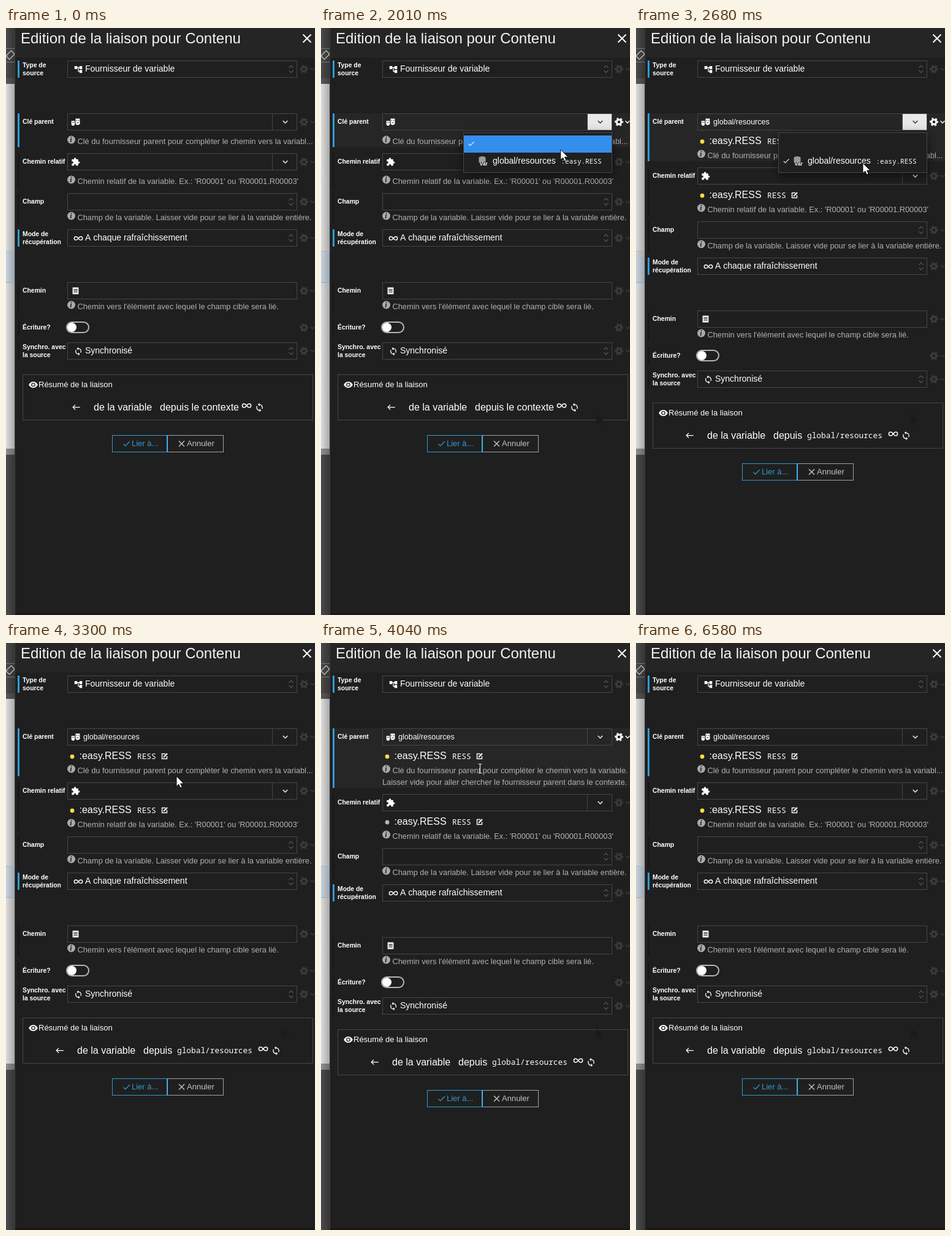
Animation of 504x956 px, one loop 7110 ms. Source, as an HTML page with a canvas:

```html
<!DOCTYPE html>
<html lang="fr">
<head>
<meta charset="utf-8">
<title>Edition de la liaison</title>
<style>
html, body { margin: 0; width: 100%; height: 100%; overflow: hidden; background: #1f1f1f; }
canvas { display: block; width: 504px; height: 956px; }
</style>
</head>
<body>
<canvas id="stage"></canvas>
<script>
const W = 504, H = 956, LOOP = 7110;
const canvas = document.getElementById('stage');
const ratio = window.devicePixelRatio || 1;
canvas.width = W * ratio;
canvas.height = H * ratio;
const c = canvas.getContext('2d');

const SANS = '"Liberation Sans", Arial, sans-serif';
const MONO = '"Noto Sans Mono", "DejaVu Sans Mono", monospace';
const BG = '#1f1f1f', LINE = '#464646', BLUE = '#2f9bd4', HINT = '#b2b2b2', DIM = '#3b3b3b';

// Icons on a 24 x 24 grid
const ICON = {
  tree: 'M22 11V3h-7v3H9V3H2v8h7V8h2v10h4v3h7v-8h-7v3h-2V8h2v3z',
  puzzle: 'M20.5 11H19V7c0-1.1-.9-2-2-2h-4V3.5a2.5 2.5 0 0 0-5 0V5H4c-1.1 0-2 .9-2 2v3.8h1.5a2.7 2.7 0 0 1 0 5.4H2V20c0 1.1.9 2 2 2h3.8v-1.5a2.7 2.7 0 0 1 5.4 0V22H17c1.1 0 2-.9 2-2v-4h1.5a2.5 2.5 0 0 0 0-5z',
  sync: 'M12 4V1L8 5l4 4V6c3.3 0 6 2.7 6 6 0 1-.25 2-.7 2.8l1.46 1.46A7.9 7.9 0 0 0 20 12c0-4.4-3.6-8-8-8zm0 14c-3.3 0-6-2.7-6-6 0-1 .25-2 .7-2.8L5.24 7.74A7.9 7.9 0 0 0 4 12c0 4.4 3.6 8 8 8v3l4-4-4-4v3z',
  eye: 'M12 4.5C7 4.5 2.7 7.6 1 12c1.7 4.4 6 7.5 11 7.5s9.3-3.1 11-7.5c-1.7-4.4-6-7.5-11-7.5zM12 17a5 5 0 1 1 0-10 5 5 0 0 1 0 10zm0-8a3 3 0 1 0 0 6 3 3 0 0 0 0-6z',
  back: 'M9 19l1.4-1.4L5.8 13H22v-2H5.8l4.6-4.6L9 5l-7 7z',
  check: 'M9 16.2L4.8 12l-1.4 1.4L9 19 21 7l-1.4-1.4z',
  list: 'M3 2h18v20H3zM6 7h12v2H6zM6 11h12v2H6zM6 15h12v2H6z',
  masks: 'M1 9h9v8a4.5 4.5 0 0 1-9 0zM3 12h2v2H3zM6.5 12h2v2h-2zM12 3h11v9a5.5 5.5 0 0 1-11 4zM14 7h2v2h-2zM19 7h2v2h-2zM15 13h5v1.6h-5z'
};
const LOOPS = 'M12 12C10 9 8.5 8 6.5 8a4 4 0 0 0 0 8c2 0 3.5-1 5.5-4s3.5-4 5.5-4a4 4 0 0 1 0 8c-2 0-3.5-1-5.5-4';
const ARROW = new Path2D('M0 0V16.5L3.8 13 6.4 18.8 9.2 17.6 6.6 12H12z');

const ROWS = [
  { y: 53, h: 28, label: ['Type de', 'source'], blue: 1, icon: 'tree', value: 'Fournisseur de variable', kind: 'select' },
  { y: 139, h: 55, label: ['Clé parent'], blue: 1, icon: 'masks', kind: 'combo', hintY: 45,
    hint: 'Clé du fournisseur parent pour compléter le chemin vers la variabl...' },
  { y: 204, h: 55, label: ['Chemin relatif'], icon: 'puzzle', kind: 'combo', hintY: 45,
    hint: "Chemin relatif de la variable. Ex.: 'R00001' ou 'R00001.R00003'" },
  { y: 269, h: 50, label: ['Champ'], kind: 'select', hintY: 39,
    hint: 'Champ de la variable. Laisser vide pour se lier à la variable entière.' },
  { y: 328, h: 28, label: ['Mode de', 'récupération'], blue: 1, icon: 'loops', value: 'A chaque rafraîchissement', kind: 'select' },
  { y: 414, h: 49, label: ['Chemin'], icon: 'list', kind: 'input', hintY: 39,
    hint: "Chemin vers l'élément avec lequel le champ cible sera lié." },
  { y: 474, h: 27, label: ['Écriture?'], kind: 'toggle' },
  { y: 512, h: 28, label: ['Synchro. avec', 'la source'], icon: 'sync', value: 'Synchronisé', kind: 'select' }
];

// Pointer moves: start, end, number of steps, [progress, x, y] points
const MOVES = [
  [530, 1210, 11, [[0, 438, 866], [.1, 449, 627], [.3, 450, 440], [.5, 452, 285], [.7, 454, 180], [.85, 457, 128], [1, 456, 152]]],
  [1870, 2280, 7, [[0, 448, 157], [.33, 391, 198], [.67, 375, 215], [1, 370, 220]]],
  [2840, 3500, 11, [[0, 370, 220], [.35, 328, 252], [.7, 278, 217], [1, 262, 211]]],
  [3570, 3840, 4, [[0, 261, 210], [1, 259.5, 205]]],
  [4040, 4040, 1, [[0, 259.5, 204.5]]],
  [4830, 5520, 10, [[0, 260, 205], [.5, 268, 214], [1, 279, 225]]],
  [5580, 5580, 1, [[0, 280.5, 227]]],
  [6380, 6510, 3, [[0, 292, 300], [.5, 310, 590], [1, 326, 918]]]
];

function pointer(t) {
  if (t < 530 || t >= 6580) return null;
  const [t0, t1, n, pts] = MOVES.filter(m => t >= m[0]).pop();
  let u = 0;
  if (n > 1) u = Math.floor(Math.min(1, (t - t0) / (t1 - t0)) * (n - 1) + .02) / (n - 1);
  let i = 1;
  while (i < pts.length - 1 && u > pts[i][0]) i++;
  const a = pts[i - 1] || pts[0], b = pts[i] || a;
  const k = b === a ? 0 : (u - a[0]) / (b[0] - a[0]);
  return { x: a[1] + (b[1] - a[1]) * k, y: a[2] + (b[2] - a[2]) * k };
}

function rect(x, y, w, h, fill) {
  c.fillStyle = fill;
  c.fillRect(x, y, w, h);
}

function frame(x, y, w, h, color = LINE) {
  c.strokeStyle = color;
  c.lineWidth = 1;
  c.strokeRect(x + .5, y + .5, w - 1, h - 1);
}

function text(s, x, y, size, color = '#fff', font = SANS, weight = '') {
  c.font = `${weight} ${size}px ${font}`;
  c.fillStyle = color;
  c.fillText(s, x, y);
}

function poly(pts, color, width) {
  c.beginPath();
  pts.forEach(([x, y]) => c.lineTo(x, y));
  c.strokeStyle = color;
  c.lineWidth = width;
  c.stroke();
}

function disc(x, y, r, color) {
  c.beginPath();
  c.arc(x, y, r, 0, Math.PI * 2);
  c.fillStyle = color;
  c.fill();
}

function icon(name, x, y, size, color = '#fff') {
  c.save();
  c.translate(x, y);
  c.scale(size / 24, size / 24);
  c.translate(-12, -12);
  if (name === 'loops') {
    c.strokeStyle = color;
    c.lineWidth = 2;
    c.stroke(new Path2D(LOOPS));
  } else {
    c.fillStyle = color;
    c.fill(new Path2D(ICON[name]), 'evenodd');
  }
  c.restore();
}

function chevron(x, y, r, color, width = 1.5, dir = 1) {
  poly([[x - r, y - dir * r / 2], [x, y + dir * r / 2], [x + r, y - dir * r / 2]], color, width);
}

function cross(x, y, r, color, width) {
  poly([[x - r, y - r], [x + r, y + r]], color, width);
  poly([[x - r, y + r], [x + r, y - r]], color, width);
}

function gear(x, y, color) {
  c.strokeStyle = color;
  c.lineWidth = 3;
  c.beginPath();
  c.arc(x, y, 3.8, 0, Math.PI * 2);
  c.stroke();
  c.lineWidth = 2;
  c.setLineDash([Math.PI, Math.PI]);
  c.beginPath();
  c.arc(x, y, 6, -.26, Math.PI * 2 - .26);
  c.stroke();
  c.setLineDash([]);
}

function info(x, y) {
  disc(x, y, 6.5, '#a9a9a9');
  text('i', x - 2.3, y + 4.2, 12, BG, '"Liberation Serif", serif', 'italic bold');
}

function shade(y, h, from, to) {
  const g = c.createLinearGradient(0, 0, 14, 0);
  g.addColorStop(0, from);
  g.addColorStop(1, to);
  rect(0, y, 14, h, g);
}

function backdrop() {
  rect(0, 0, W, H, BG);
  rect(15, 0, W - 15, 48, '#252525');
  shade(0, 82, '#4a4a4a', '#353535');
  shade(82, 9, '#585858', '#414141');
  shade(91, 594, '#dcdcdc', '#a9a9a9');
  shade(363, 52, '#c7d3de', '#9ba6b0');
  rect(0, 363, 14, 1, '#a9b4bd');
  rect(0, 414, 14, 1, '#8fa9c4');
  shade(685, 10, '#8e8e8e', '#6c6c6c');
  shade(695, 261, '#4b4b4b', '#363636');
  c.save();
  c.beginPath();
  c.rect(0, 30, 14, 28);
  c.clip();
  rect(0, 33, 14, 1, '#777');
  rect(0, 55, 14, 1, '#777');
  c.translate(7, 44);
  c.rotate(Math.PI / 4);
  c.strokeStyle = '#c4c4c4';
  c.lineWidth = 1.3;
  c.strokeRect(-4, -6, 8, 12);
  c.restore();
  rect(14, 0, 1, H, '#3d3d3d');
  rect(15, 953, W - 15, 3, '#1a161a');
  text('Edition de la liaison pour Contenu', 24, 25, 24, '#f4f4f4');
  cross(491, 17, 6.5, '#fff', 2);
}

function entry(y, dot) {
  disc(108, y + 46, 3.4, dot);
  text(':easy.RESS', 119.5, y + 50, 16);
  text('RESS', 214, y + 50, 12.8, '#fff', MONO);
  poly([[260, y + 41.5], [254.5, y + 41.5], [254.5, y + 49.5], [262.5, y + 49.5], [262.5, y + 45]], '#fff', 1.4);
  poly([[257, y + 47], [263, y + 41]], '#fff', 2.2);
}

function drawRow(row, i, s) {
  const { y, bottom } = s.spans[i];
  const hot = s.hot === i, mid = y + 14;
  if (hot) rect(22, y, W - 22, bottom - y, '#262626');
  rect(19, y, 3, bottom - y, row.blue ? BLUE : '#181818');
  if (row.label.length > 1) row.label.forEach((l, k) => text(l, 27, y + 11 + 13 * k, 10.4, '#fff', SANS, 'bold'));
  else text(row.label[0], 27, y + 17, 10.4, '#fff', SANS, 'bold');

  if (row.kind === 'toggle') {
    c.beginPath();
    c.roundRect(99, y + 5, 36, 17, 8.5);
    c.strokeStyle = '#b4b4b4';
    c.lineWidth = 2;
    c.stroke();
    disc(107.5, y + 13.5, 7.5, '#fff');
  } else {
    frame(100, y, 375, 28);
  }
  if (row.kind === 'select') {
    chevron(465, y + 10, 3.5, '#555', 1.2, -1);
    chevron(465, y + 18, 3.5, '#555', 1.2);
  }
  if (row.kind === 'combo') {
    const lit = i === 1 && s.pressed;
    rect(434, y, 1, 28, LINE);
    if (lit) rect(435, y + 1, 39, 26, '#e9e9e9');
    chevron(455.5, mid, 3.8, lit ? '#444' : '#ddd');
  }
  if (row.icon) icon(row.icon, row.value ? 118 : 113.5, row.value ? mid + .5 : mid, row.icon === 'loops' ? 17 : row.icon === 'list' ? 13 : 15);
  if (row.value) text(row.value, 129, y + 18, 14);
  if (i === 1 && s.chosen) text('global/resources', 126, y + 18, 12.5);

  const tone = hot ? '#fff' : DIM;
  gear(486, mid, tone);
  chevron(500, mid, 3.5, tone);

  if (s.chosen && row.kind === 'combo') entry(y, i === 2 && s.wide ? '#b5b5b5' : '#f5df45');
  if (row.hint) {
    const hy = y + row.hintY + (s.chosen && row.kind === 'combo' ? 23 : 0);
    const full = i === 1 && s.wide;
    info(106.5, hy - 2);
    text(full ? row.hint.replace('variabl...', 'variable.') : row.hint, 116.5, hy + 4.5, 12.8, HINT);
    if (full) text('Laisser vide pour aller chercher le fournisseur parent dans le contexte.', 100, hy + 24, 12.8, HINT);
  }
}

function summary(dy, chosen) {
  c.save();
  c.translate(0, dy);
  frame(27, 564, 474, 75);
  icon('eye', 44.5, 581, 16);
  text('Résumé de la liaison', 53, 585, 13);
  const dx = chosen ? -27 : 0, end = chosen ? 27 : 0;
  icon('back', 114.5 + dx, 617.5, 15);
  text('de la variable', 143 + dx, 623, 16);
  text(chosen ? 'depuis' : 'depuis le contexte', 251 + dx, 623, 16);
  if (chosen) text('global/resources', 279, 622, 12.8, '#fff', MONO);
  icon('loops', 392.5 + end, 615, 18);
  icon('sync', 413.5 + end, 618, 16);
  frame(263, 663, 92, 28, '#a2a2a2');
  frame(173, 663, 91, 28, BLUE);
  rect(262, 663, 2, 28, '#44adec');
  icon('check', 196.5, 677, 15, BLUE);
  text('Lier à...', 205, 681, 13, BLUE);
  cross(286.5, 677, 4.5, '#c4c4c4', 1.4);
  text('Annuler', 295, 681, 13, '#c4c4c4');
  c.restore();
}

function menu(active, checked) {
  c.save();
  c.shadowColor = 'rgba(0,0,0,.55)';
  c.shadowBlur = 16;
  c.shadowOffsetY = 4;
  rect(232, 170, 243, 66, BG);
  c.restore();
  frame(232, 170, 243, 66);
  if (active >= 0) rect(233, 175 + 28 * active, 241, 28, '#348eec');
  icon('check', 245, 188.5 + 28 * checked, 13);
  c.beginPath();
  c.ellipse(263, 211.5, 5.5, 2.5, 0, 0, Math.PI * 2);
  c.rect(257.5, 211.5, 11, 7);
  c.fillStyle = '#9a9a9a';
  c.fill();
  text('Var', 258.5, 224, 8.5, '#fff', SANS, 'bold');
  text('global/resources', 280, 221, 14);
  text(':easy.RESS', 391.5, 220.5, 11, '#fff', MONO);
}

function drawPointer(p, beam) {
  c.save();
  c.translate(p.x, p.y);
  if (beam) {
    const bar = 'M-3 -7.5H-1L0 -6.5 1 -7.5H3M0 -6.5V6.5M-3 7.5H-1L0 6.5 1 7.5H3';
    c.strokeStyle = '#e4e4e4';
    c.lineWidth = 1.2;
    c.stroke(new Path2D(bar));
  } else {
    c.fillStyle = '#fff';
    c.fill(ARROW);
    c.strokeStyle = '#000';
    c.lineWidth = .9;
    c.stroke(ARROW);
  }
  c.restore();
}

function draw(t) {
  const p = pointer(t);
  const s = {
    chosen: t >= 2680,
    wide: t >= 3570 && t < 6380,
    pressed: t >= 1280 && t < 2840,
    hot: -1
  };
  const extra = s.wide ? 19 : 0, add = s.chosen ? 23 : 0;
  s.spans = ROWS.map((r, i) => {
    const y = r.y + (i > 1 ? add + extra : 0) + (i > 2 ? add : 0);
    const grow = r.kind === 'combo' ? add + (i === 1 ? extra : 0) : 0;
    return { y, bottom: y + r.h + grow };
  });
  if (s.pressed) s.hot = 1;
  else if (p) s.hot = s.spans.findIndex(r => p.y >= r.y && p.y < r.bottom);

  c.setTransform(ratio, 0, 0, ratio, 0, 0);
  backdrop();
  ROWS.forEach((r, i) => drawRow(r, i, s));
  summary(add * 2 + extra, s.chosen);
  if (t >= 660) {
    c.save();
    c.translate(449, 628);
    c.fillStyle = '#181a20';
    c.fill(ARROW);
    c.restore();
  }
  if (t >= 1350 && t < 2840) menu(s.chosen ? -1 : p.y >= 203 ? 1 : 0, s.chosen ? 1 : 0);
  if (p) drawPointer(p, s.wide);
}

function tick(now) {
  draw(now % LOOP);
  requestAnimationFrame(tick);
}
requestAnimationFrame(tick);
</script>
</body>
</html>
```
